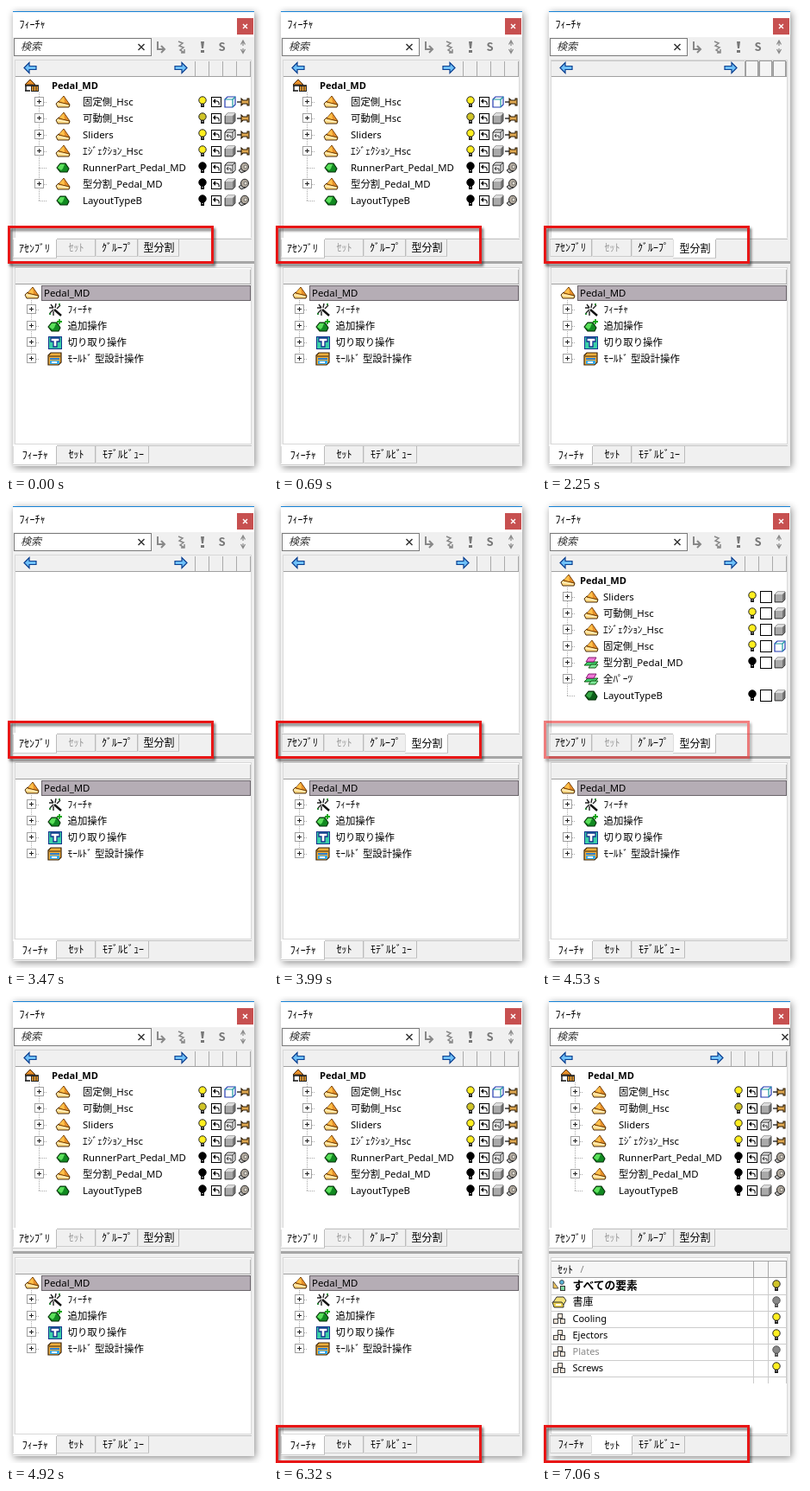
Animation of 304 by 540 pixels, one loop 8 s. Source, as an HTML page:

```html
<!DOCTYPE html>
<html lang="ja">
<head>
<meta charset="utf-8">
<style>
html, body { margin: 0; width: 100%; height: 100%; overflow: hidden; background: #fff; }
svg { display: block; width: 304px; height: 540px; }
text { font: 11.4px 'Noto Sans', 'Noto Sans CJK JP', sans-serif; white-space: pre; }
.ui { font: 12px 'Noto Sans CJK JP', 'Noto Sans CJK', sans-serif; }
.b { font-weight: 700; font-size: 11.1px; }
rect, line { shape-rendering: crispEdges; }
</style>
</head>
<body>
<svg id="stage" viewBox="0 0 304 540"></svg>
<script>
const rect = (x, y, w, h, fill, more = '') => `<rect x="${x}" y="${y}" width="${w}" height="${h}" fill="${fill}" ${more}/>`;
const frame = (x, y, w, h, fill, stroke) => rect(x + .5, y + .5, w - 1, h - 1, fill, `stroke="${stroke}"`);
const path = (d, fill = 'none', stroke = 'none', w = 1) => `<path d="${d}" fill="${fill}" stroke="${stroke}" stroke-width="${w}"/>`;
const text = (x, y, s, cls = '', fill = '#000', style = '') => `<text x="${x}" y="${y}" class="${cls}" fill="${fill}" style="${style}">${s}</text>`;
const at = (x, y, s) => `<g transform="translate(${x} ${y})">${s}</g>`;
const group = (id, s) => `<g id="${id}">${s}</g>`;
const dots = (x1, y1, x2, y2) => `<line x1="${x1}" y1="${y1}" x2="${x2}" y2="${y2}" stroke="#aaa" stroke-dasharray="1 1"/>`;

// Icons, centred on 0,0
const bulb = (c, edge = '#222') =>
  `<circle cy="-2" r="4.2" fill="${c}" stroke="${edge}"/>` + rect(-2, 2, 4, 4, edge) + rect(-1, 3, 2, 1, '#999');
const cone = path('M-8 2L-5-1L8 3L7 6H-6Z', '#ffd880', '#4b2b08') + path('M-5 0L1-7L8 3Z', '#e8902a', '#6b3c05', .9) +
  path('M-4-1L1-6L2 1Z', '#ffc24a') + path('M-7 2L6 4', 'none', '#fff3d0', 1.2);
const gem = (light, dark) => path('M-7 0L-3-5H3L7 1L5 5H-3Z', dark, '#032d06', 1.1) + path('M-6 0L-3-4H2L0 1L-2 3Z', light);
const part = gem('#5be05b', '#128a22'), darkPart = gem('#37a846', '#0d5f1a');
const layers = path('M-8 3L-4-1H8L4 3Z', '#3fd06a', '#064d06', .9) + path('M-6-1L-3-6H6L3-1Z', '#f07ad8', '#7a0b66', .9) +
  path('M-3 6L0 2H8L5 6Z', '#7fe89a', '#064d06', .9);
const assembly = path('M-8-1L-2-7L4-1Z', '#e8902a', '#4b2b08') + path('M-7 0V6M-8 6H-2M-8 0H8', 'none', '#111', 1.4) +
  frame(-1, 0, 9, 7, '#f0a030', '#222') + path('M2 1V6M5 1V6', 'none', '#222');
const undo = frame(-6, -6, 12, 12, '#fff', '#000') + path('M-4-1L-1-4V2Z', '#000') + path('M-2-1H1Q4 0 3 3.5', 'none', '#000', 1.1);
const blankBox = frame(-7, -7, 14, 14, '#fff', '#000');
const cube = path('M-6-3L-3-6H6V3L3 6H-6Z', '#777', '#333', .8) + path('M-6-3L-3-6H6L3-3Z', '#ddd') + rect(-5, -3, 8, 8, '#aaa');
const wire = path('M-6-3L-3-6H6V3L3 6H-6Z', '#fff', '#2238b0', 1.2) + path('M-6-3H3V6M3-3L6-6', 'none', '#1b9aa0', 1.2);
const arrowCube = path('M-6-3L-3-6H6V3L3 6H-6Z', '#eee', '#222') + path('M-6-3H3V6M3-3L6-6M-4 1H1V4M-2-1L-4 1L-2 3', 'none', '#222', .9);
const pin = path('M-8 0H-3', 'none', '#111', 1.3) + path('M-3-4V4L-1 2H4V4H6V-4H4V-2H-1Z', '#e0a850', '#2a1a05', 1.1);
const knob = path('M-6 3L-2 0L2 4L-3 6Z', '#bbb', '#222') + '<ellipse cx="1" cy="-1" rx="4.5" ry="4.8" fill="#b4aca0" stroke="#222"/>' +
  '<circle cx="2" cy="-1" r="2" fill="#e0dbd0" stroke="#555" stroke-width=".7"/>';
const wand = path('M-1 0L7 7', 'none', '#111', 2.4) + path('M-7-2H-2M-5-6L-2-2M1-7L0-2M-6 4L-2 0M6-5L2-1M-2 2V7', 'none', '#222', 1.4) +
  rect(-7, 4, 2, 2, '#2a8a3a') + rect(4, -7, 2, 2, '#2a8a3a');
const addOp = at(-1, 1, part) + path('M5-8V-2M2-5H8', 'none', '#13a413', 1.8);
const cutOp = frame(-8, -7, 16, 15, '#3ad0a8', '#12318c') + path('M-5-5H5V-1H2V5H-2V-1H-5Z', '#fff', '#12318c', 1.3);
const mold = path('M-8-4L-5-7H7V4L4 7H-8Z', '#f0b040', '#3b2206', 1.2) + path('M-7-3H6', 'none', '#3b2206') +
  rect(-6, -1, 11, 2, '#2a7fd0') + rect(-6, 2, 11, 4, '#39a8e8') + rect(-4, 3, 6, 2, '#fff');
const setIcon = frame(-2, -6, 6, 6, '#f4e6d8', '#444') + frame(-7, 0, 6, 6, '#f4e6d8', '#444') + frame(1, 0, 6, 6, '#f4e6d8', '#444');
const allIcon = path('M-7-5V3L-1 3Z', '#f2c75c', '#444', .9) + frame(1, 0, 6, 6, '#7fd6a0', '#333') + '<circle cx="3" cy="-4" r="2.5" fill="#59b4d8" stroke="#333" stroke-width=".8"/>';
const archive = path('M-7 0L-3-6H5L8-2L5 3Z', '#f4e27a', '#333') + path('M-8 0H3L5 3V6H-6Z', '#e8cf50', '#333') + rect(-4, 2, 6, 2, '#fff');
const yellow = bulb('#ffef20'), dim = bulb('#d0c428'), black = bulb('#000', '#000'), grey = bulb('#888', '#555');
const plus = frame(-5, -5, 11, 11, '#fff', '#a0a0a0') + rect(-2, 0, 5, 1, '#222') + rect(0, -2, 1, 5, '#222');
const arrow = path('M-7 0L-1-6V-2H7V2H-1V6Z', '#6fc0f8', '#0b3f90', 1.2);

// Header bar with n narrow columns at the right
function header(n, raised) {
  const first = 284 - 16 * n;
  let s = rect(11, 63, 273, 18, '#f0f0f0') + rect(11, 81, 273, 1, '#a0a0a0');
  for (let i = 0; i <= n; i++) s += rect(first - 1 + 16 * i, 64, 1, 17, '#aaa');
  if (raised) {
    s += rect(11, 63, 224, 1, '#c8c8c8');
    for (let i = 0; i < n; i++) s += frame(first + 16 * i, 63, 15, 19, '#f4f4f4', '#999');
  }
  return s + at(28, 71.5, arrow) + at(first - 17, 71.5, '<g transform="scale(-1 1)">' + arrow + '</g>');
}

// Tree rows: [label, icon, column icons, is leaf]
function tree(x, y, labelX, rows) {
  let s = dots(x + .5, y - 11, x + .5, y + 19 * (rows.length - 1));
  rows.forEach(([label, icon, cols, leaf], i) => {
    const cy = y + i * 19;
    s += dots(x, cy + .5, x + 9, cy + .5) + (leaf ? '' : at(x, cy - 1, plus)) + at(x + 28, cy, icon) + text(labelX, cy + 4, label);
    cols.forEach((c, k) => s += at(276 - 16 * (cols.length - 1 - k), cy, c));
  });
  return s;
}

const asmRows = [
  ['固定側_Hsc', cone, [yellow, undo, wire, pin]],
  ['可動側_Hsc', cone, [dim, undo, cube, pin]],
  ['Sliders', cone, [yellow, undo, arrowCube, pin]],
  ['ｴｼﾞｪｸｼｮﾝ_Hsc', cone, [yellow, undo, cube, pin]],
  ['RunnerPart_Pedal_MD', part, [black, undo, arrowCube, knob], 1],
  ['型分割_Pedal_MD', cone, [black, undo, cube, knob]],
  ['LayoutTypeB', part, [black, undo, cube, knob], 1]
];
const divRows = [
  ['Sliders', cone, [yellow, blankBox, cube]],
  ['可動側_Hsc', cone, [yellow, blankBox, cube]],
  ['ｴｼﾞｪｸｼｮﾝ_Hsc', cone, [yellow, blankBox, cube]],
  ['固定側_Hsc', cone, [yellow, blankBox, wire]],
  ['型分割_Pedal_MD', layers, [black, blankBox, cube]],
  ['全ﾊﾟｰﾂ', layers, []],
  ['LayoutTypeB', darkPart, [black, blankBox, cube], 1]
];
const featureRows = [['ﾌｨｰﾁｬ', wand, []], ['追加操作', addOp, []], ['切り取り操作', cutOp, []], ['ﾓｰﾙﾄﾞ 型設計操作', mold, []]];
const setRows = [
  ['すべての要素', allIcon, dim], ['書庫', archive, grey], ['Cooling', setIcon, yellow],
  ['Ejectors', setIcon, yellow], ['Plates', setIcon, grey], ['Screws', setIcon, yellow]
];

// Tabs: [left, right, label, label x, colour]
function tabs(y, list, sel) {
  let s = rect(8, y, 280, 24, '#f0f0f0') + rect(9, y + 1, 276, 1, '#c4c4c4');
  const one = ([l, r, label, tx, c], i) => {
    const on = i === sel, a = on ? l - 1 : l, w = r - l + (on ? 2 : 0);
    return rect(a, on ? y : y + 2, w, on ? 24 : 20, on ? '#fff' : '#f0f0f0') + rect(a + w - 1, y + 2, 1, on ? 22 : 20, '#bbb') +
      rect(a, y + (on ? 23 : 21), w, 1, '#ccc') + rect(a, y + 2, 1, 20, '#ddd') + text(tx, y + (on ? 17 : 16), label, 'ui', c);
  };
  list.forEach((tab, i) => { if (i !== sel) s += one(tab, i); });
  return s + one(list[sel], sel);
}
const upperTabs = [[9, 58, 'ｱｾﾝﾌﾞﾘ', 15], [58, 104, 'ｾｯﾄ', 72.5, '#999'], [104, 153, 'ｸﾞﾙｰﾌﾟ', 111], [153, 201, '型分割', 159.5]];
const lowerTabs = [[9, 58, 'ﾌｨｰﾁｬ', 18.8], [58, 104, 'ｾｯﾄ', 72.5], [104, 166, 'ﾓﾃﾞﾙﾋﾞｭｰ', 112]];

const search = (right, cross) => frame(9, 37, right - 9, 21, '#fff', '#7a7a7a') +
  text(17, 51, '検索', 'ui', '#333', 'font-style:italic') +
  path(`M${cross - 3.5} 44l7 7m0-7l-7 7`, 'none', '#333', 1.5);
const tools = path('M176 41V50H183M180 46L184 50L180 54', 'none', '#888', 2) +
  path('M200 41L205 43L201 46L206 48L202 51L207 54M207 50V54H203', 'none', '#888', 1.5) +
  path('M226 41H230L229 49H227Z', '#777') + rect(226, 51, 4, 3, '#777') +
  text(246.5, 52, 'S', 'ui', '#777', 'font-size:13px;font-weight:700') +
  path('M272.5 44.5L275 40L277.5 44.5M272.5 50L275 54.5L277.5 50M275 40V46M275 49V54', 'none', '#888', 1.2);

const columns = [245, 262, 283];
const setHeader = rect(11, 307, 273, 18, '#f6f6f6') + rect(11, 306, 273, 1, '#a0a0a0') + rect(11, 325, 273, 1, '#a0a0a0') +
  columns.map(x => rect(x, 307, 1, 18, '#aaa')).join('') + text(18, 321, 'ｾｯﾄ', 'ui') + path('M45 320L48 312', 'none', '#888');
const rowStyle = ['font-size:12.8px;font-weight:700', 'font-weight:500'];
const setList = columns.map(x => rect(x, 326, 1, 122, '#ccc')).join('') + setRows.map(([label, icon, lamp], i) => {
  const y = 335 + 19 * i;
  return rect(11, y + 10, 273, 1, '#ccc') + at(20, y, icon) + at(272, y, lamp) +
    text(35.5, y + 4, label, i < 2 ? 'ui' : '', i === 4 ? '#888' : '#000', rowStyle[i] || 'font-size:11px');
}).join('');

const mark = (id, y) => group(id, rect(3.5, y, 236, 41, 'none', 'stroke="#e81414" stroke-width="3" filter="url(#drop)"'));

stage.innerHTML = `<defs>
  <filter id="soft" x="-10%" y="-10%" width="120%" height="120%"><feDropShadow dx="1.5" dy="2" stdDeviation="4.5" flood-opacity=".45"/></filter>
  <filter id="drop" filterUnits="userSpaceOnUse" x="0" y="240" width="304" height="300"><feDropShadow dx="2" dy="3" stdDeviation="1.6" flood-opacity=".55"/></filter>
</defs>` +
  rect(8, 6, 280, 526, '#f0f0f0', 'filter="url(#soft)"') + rect(8, 7, 280, 29, '#fff') + rect(8, 6, 280, 1, '#1883d7') +
  text(15.6, 26, 'ﾌｨｰﾁｬ', 'ui') + rect(268, 14, 19, 19, '#c75050') + path('M275 21l5 5m0-5l-5 5', 'none', '#fff', 1.4) +
  group('shortSearch', search(169, 157) + tools) + group('longSearch', search(288, 282)) +
  frame(10, 62, 275, 207, '#fff', '#d8d8d8') +
  group('asmHead', header(4)) + group('divHead', header(3)) + group('rawHead', header(3, true)) +
  group('asmList', at(30, 92, assembly) + text(53, 96, 'Pedal_MD', 'b') + tree(38, 111, 89, asmRows)) +
  group('divList', at(30, 92, cone) + text(44, 96, 'Pedal_MD', 'b') + tree(29, 111, 71, divRows)) +
  group('asmTab', tabs(268, upperTabs, 0)) + group('divTab', tabs(268, upperTabs, 3)) +
  rect(8, 295, 280, 3, '#a6a6a6') + frame(10, 302, 275, 205, '#fff', '#d8d8d8') +
  group('feature', rect(11, 304, 273, 17, '#f0f0f0') + rect(11, 321, 273, 1, '#a0a0a0') + rect(283, 305, 1, 16, '#bbb') +
    frame(41, 323, 243, 18, '#b5adb5', '#6b656b') +
    at(30, 332, cone) + text(44, 336, 'Pedal_MD') + tree(29, 351, 71.5, featureRows) + tabs(507, lowerTabs, 0)) +
  group('sets', setHeader + tabs(507, lowerTabs, 1)) + group('setList', setList) +
  mark('upperMark', 255.5) + mark('lowerMark', 497.5);

const show = (id, on) => document.getElementById(id).style.display = on ? '' : 'none';

// [start, tab, list filled, raised header]
const steps = [
  [0, 'asm', 1], [500, 'asm', 0], [630, 'asm', 1], [2250, 'div', 0, 1], [2450, 'div', 0], [2480, 'div', 1],
  [3470, 'asm', 0], [3530, 'asm', 1], [3990, 'div', 0], [4080, 'div', 1], [4800, 'asm', 0], [4890, 'asm', 1]
];

function draw(now) {
  const t = now % 8000;
  const [, tab, filled, raised] = steps.findLast(s => s[0] <= t);
  for (const id of ['asm', 'div']) {
    show(id + 'Tab', tab === id);
    show(id + 'Head', tab === id && !raised);
    show(id + 'List', tab === id && filled);
  }
  show('rawHead', raised);
  show('feature', t < 6870);
  show('sets', t >= 6870);
  show('setList', t >= 7050);
  show('shortSearch', t < 7030);
  show('longSearch', t >= 7030);
  const fade = Math.min(1, Math.max(0, (t - 4050) / 870));
  upperMark.style.opacity = 1 - fade ** 1.3;
  show('lowerMark', t >= 6320);
  requestAnimationFrame(draw);
}
draw(0);
</script>
</body>
</html>
```
